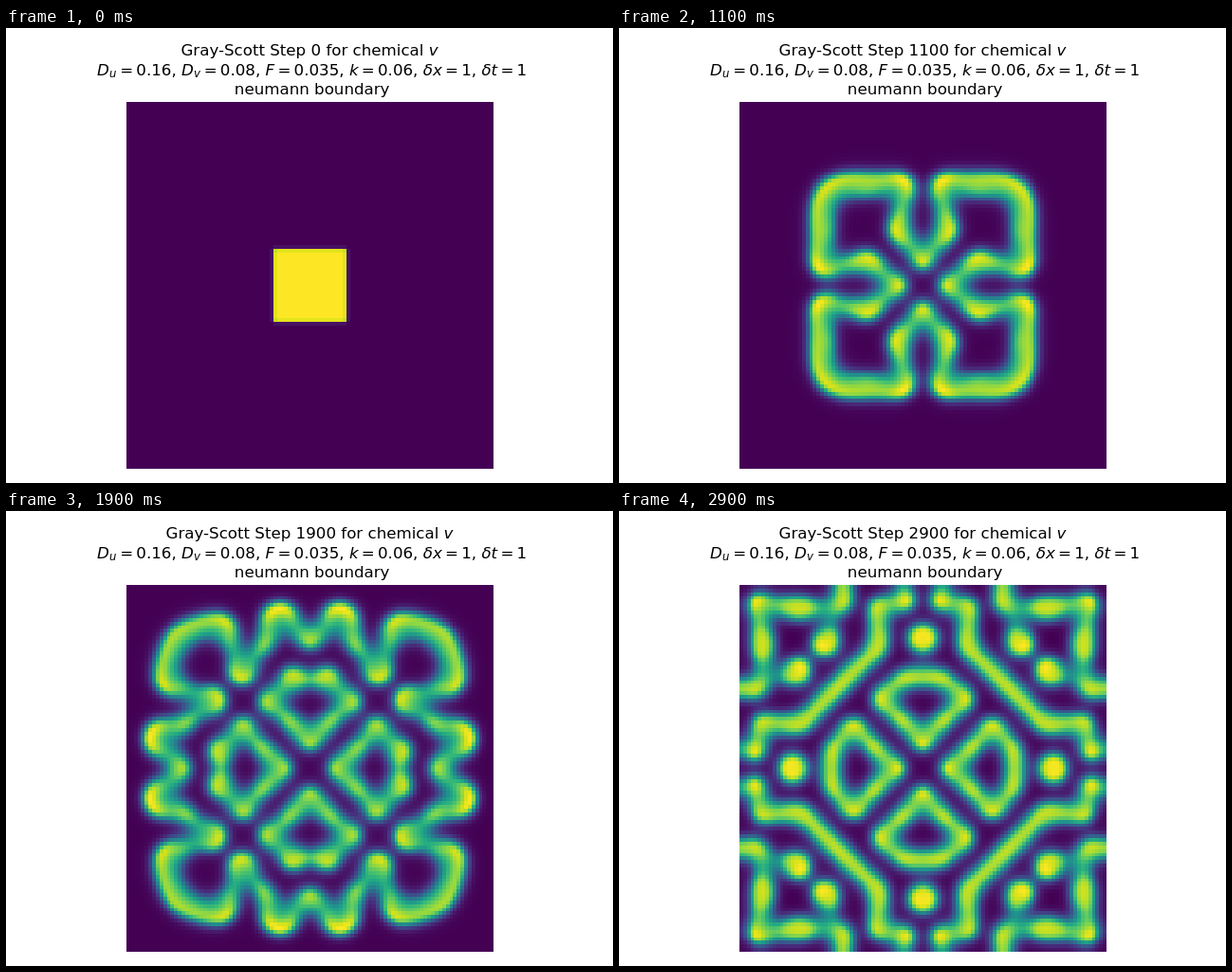
Animation of 640x480 px, one loop 3 s. Source, as an HTML page with a canvas:

```html
<!DOCTYPE html>
<html lang="en">
<head>
<meta charset="utf-8">
<title>Gray-Scott</title>
<style>
html, body { margin: 0; width: 100%; height: 100%; overflow: hidden; background: #fff; }
body { position: relative; color: #000; font: 16.667px/20px "DejaVu Sans", sans-serif; }
div { position: absolute; left: 0; width: 640px; text-align: center; white-space: pre; }
b { font-weight: normal; margin: 0 3.25px; }
sub { font-size: 70%; line-height: 0; vertical-align: -2px; margin-right: .6px; }
canvas { position: absolute; left: 127px; top: 78px; width: 387px; height: 387px; image-rendering: pixelated; }
</style>
</head>
<body>
<div style="top:14px">Gray-Scott Step <span id="step">0</span> for chemical <i>v</i></div>
<div style="top:35px"> <i>D<sub>u</sub></i><b>=</b>0.16, <i>D<sub>v</sub></i><b>=</b>0.08, <i>F</i><b>=</b>0.035, <i>k</i><b>=</b>0.06, <i>δx</i><b>=</b>1, <i>δt</i><b>=</b>1</div>
<div style="top:55px"> neumann boundary</div>
<canvas id="field" width="100" height="100"></canvas>
<script>
const N = 100, FRAMES = 30, STEPS = 100, FRAME_MS = 100;
const Du = 0.16, Dv = 0.08, F = 0.035, k = 0.06;

const viridis = ('440154 481567 482677 453781 404788 39568c 33638d 2d708e 287d8e 238a8d ' +
  '1f968b 20a387 29af7f 3cbb75 55c667 73d055 95d840 b8de29 dce319 fde725')
  .split(' ').map(hex => [0, 2, 4].map(i => parseInt(hex.slice(i, i + 2), 16)));

function colour(t) {
  const x = t * (viridis.length - 1), i = Math.min(Math.floor(x), viridis.length - 2);
  return viridis[i].map((c, j) => c + (viridis[i + 1][j] - c) * (x - i));
}

let u = new Float64Array(N * N).fill(1), v = new Float64Array(N * N);
let nextU = new Float64Array(N * N), nextV = new Float64Array(N * N);
for (let y = 40; y < 60; y++) v.fill(1, y * N + 40, y * N + 60);

function advance() {
  for (let y = 0; y < N; y++) {
    const up = y ? -N : 0, down = y < N - 1 ? N : 0;
    for (let x = 0; x < N; x++) {
      const i = y * N + x, a = i + up, b = i + down;
      const l = x ? i - 1 : i, r = x < N - 1 ? i + 1 : i;
      const reaction = u[i] * v[i] * v[i];
      nextU[i] = u[i] + Du * (u[a] + u[b] + u[l] + u[r] - 4 * u[i]) - reaction + F * (1 - u[i]);
      nextV[i] = v[i] + Dv * (v[a] + v[b] + v[l] + v[r] - 4 * v[i]) + reaction - (F + k) * v[i];
    }
  }
  [u, nextU, v, nextV] = [nextU, u, nextV, v];
}

// Each picture is scaled to its own range.
function snapshot() {
  const image = new ImageData(N, N);
  const min = Math.min(...v), max = Math.max(...v);
  v.forEach((value, i) => image.data.set([...colour((value - min) / (max - min)), 255], i * 4));
  return image;
}

const images = [];
for (let n = 0; n <= (FRAMES - 1) * STEPS; n++) {
  advance();
  if (n % STEPS === 0) images.push(snapshot());
}

const ctx = document.getElementById('field').getContext('2d');
const label = document.getElementById('step');

function draw() {
  const frame = Math.floor(performance.now() / FRAME_MS) % FRAMES;
  ctx.putImageData(images[frame], 0, 0);
  label.textContent = frame * STEPS;
  requestAnimationFrame(draw);
}
draw();
</script>
</body>
</html>
```
